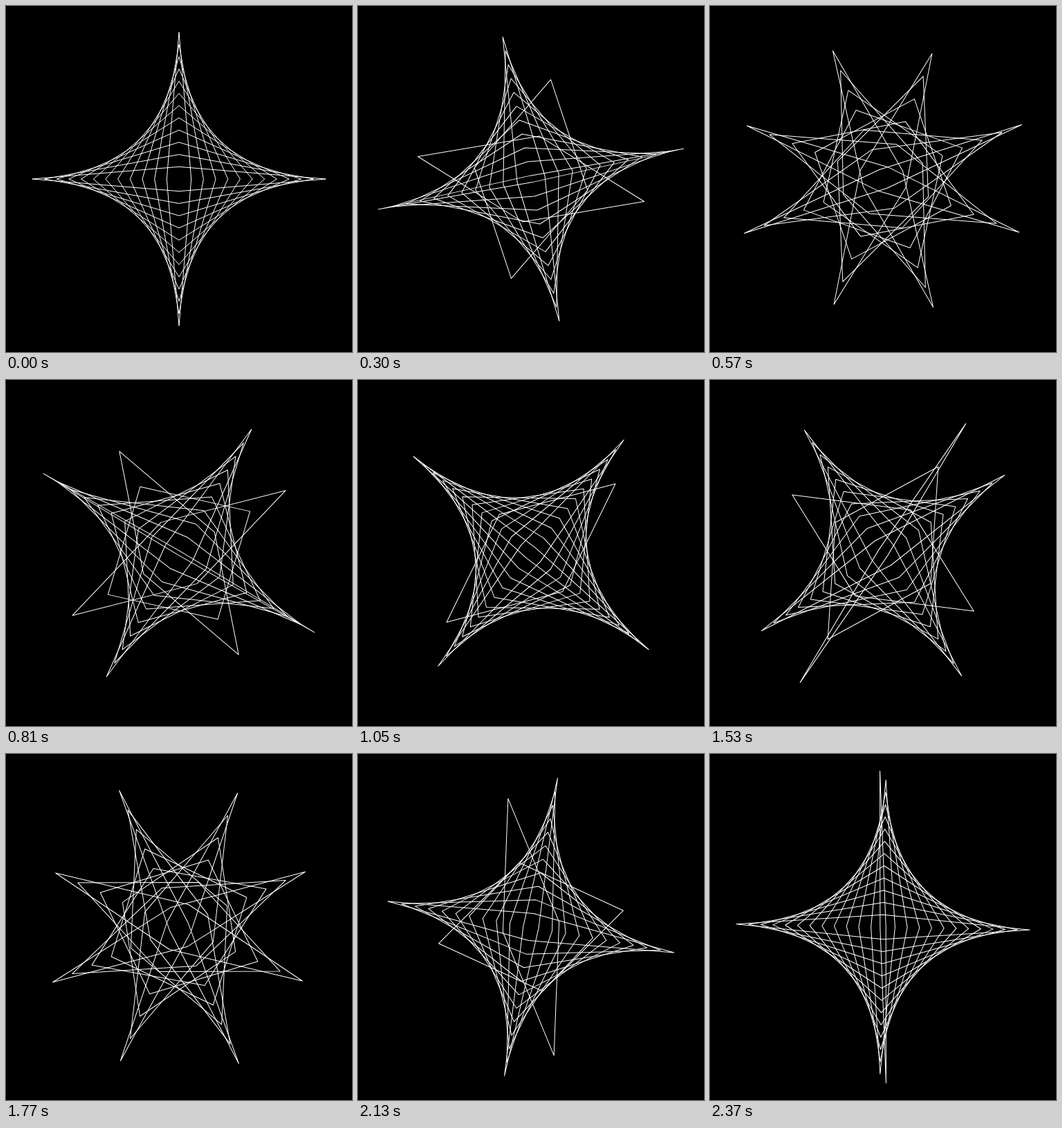
These frames come from a looping animation (500 px wide and 500 px high, 2400 ms). An HTML page with a canvas:

```html
<!DOCTYPE html>
<html lang="en">
<head>
<meta charset="utf-8">
<title>Counter-rotating rhombi</title>
<style>
  html, body { margin: 0; height: 100%; overflow: hidden; background: #000; }
  canvas { display: block; }
</style>
</head>
<body>
<canvas id="stage" width="500" height="500"></canvas>
<script>
const ctx = document.getElementById('stage').getContext('2d');
const LOOP = 2400, STEP = 30;
const REACH = 325 / Math.SQRT2; // sum of both half-diagonals of every rhombus

// Rhombi whose half-width is a multiple of REACH / count, all turned by angle.
function drawFamily(count, angle) {
  ctx.save();
  ctx.translate(250, 250);
  ctx.rotate(angle);
  for (let i = 1; i < count - 1e-9; i++) {
    const w = REACH * i / count, h = REACH - w;
    ctx.beginPath();
    ctx.moveTo(w, 0);
    ctx.lineTo(0, h);
    ctx.lineTo(-w, 0);
    ctx.lineTo(0, -h);
    ctx.closePath();
    ctx.stroke();
  }
  ctx.restore();
}

function draw(now) {
  const p = Math.floor(now % LOOP / STEP) * STEP / LOOP;
  const swing = 6 * Math.cos(2 * Math.PI * p);
  const angle = p * Math.PI / 2;
  ctx.fillStyle = '#000';
  ctx.fillRect(0, 0, 500, 500);
  ctx.strokeStyle = '#fff';
  ctx.lineWidth = 1;
  ctx.lineJoin = 'round';
  drawFamily(7 - swing, angle);
  drawFamily(7 + swing, -angle);
}

function tick() {
  draw(performance.now());
  requestAnimationFrame(tick);
}
tick();
</script>
</body>
</html>
```
